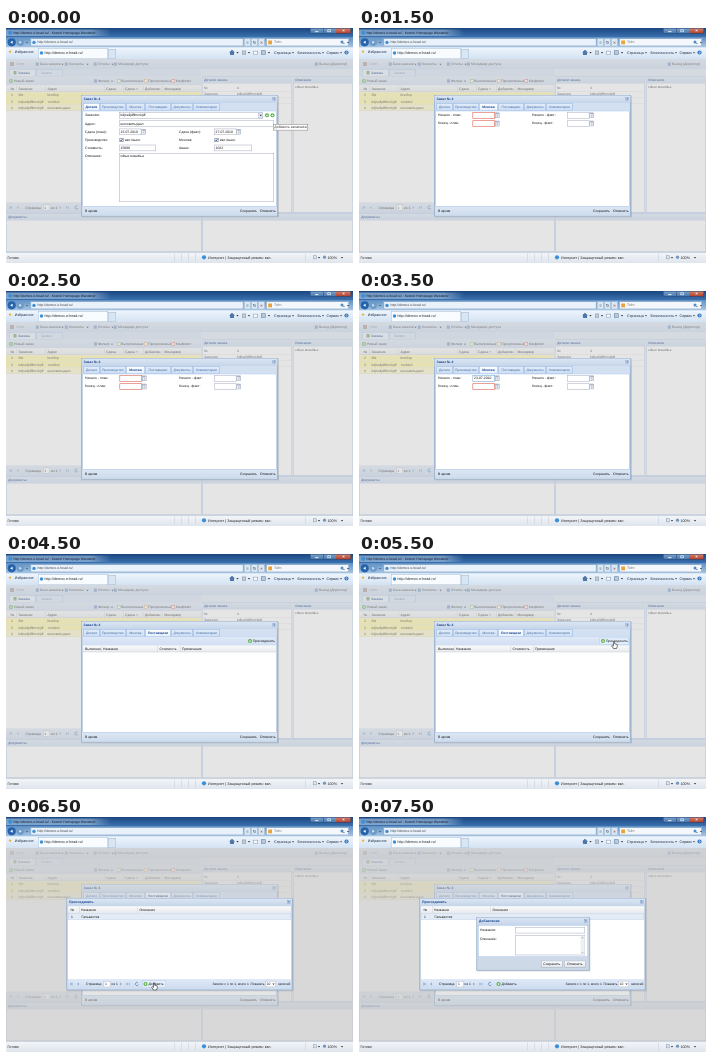
Recreate the animation shown at these times as an HTML page with a canvas. Size 347 by 235 pixels, loop 8000 ms.

```html
<!DOCTYPE html>
<html lang="ru">
<head>
<meta charset="utf-8">
<title>Заказы</title>
<style>
html, body { margin: 0; width: 100%; height: 100%; overflow: hidden; background: #fff; }
canvas { display: block; width: 347px; height: 235px; }
</style>
</head>
<body>
<canvas id="stage"></canvas>
<script>
const W = 347, H = 235, LOOP = 8000;
const canvas = document.getElementById('stage');
const ctx = canvas.getContext('2d');
const dpr = window.devicePixelRatio || 1;
canvas.width = W * dpr;
canvas.height = H * dpr;
ctx.scale(dpr, dpr);
ctx.textRendering = 'geometricPrecision';

const NAVY = '#15428b', LINE = '#99bbe8', FIELD = '#b5b8c8', GREEN = '#4fae3c';

function rect(x, y, w, h, color) {
  ctx.fillStyle = color;
  ctx.fillRect(x, y, w, h);
}

function frame(x, y, w, h, color, width = 0.6) {
  ctx.strokeStyle = color;
  ctx.lineWidth = width;
  ctx.strokeRect(x + width / 2, y + width / 2, w - width, h - width);
}

function box(x, y, w, h, fill, stroke, width) {
  rect(x, y, w, h, fill);
  frame(x, y, w, h, stroke, width);
}

function shade(x, y, w, h, top, bottom) {
  const g = ctx.createLinearGradient(0, y, 0, y + h);
  g.addColorStop(0, top);
  g.addColorStop(1, bottom);
  rect(x, y, w, h, g);
}

function dot(x, y, r, color) {
  ctx.fillStyle = color;
  ctx.beginPath();
  ctx.arc(x, y, r, 0, Math.PI * 2);
  ctx.fill();
}

function poly(points, fill, stroke) {
  ctx.beginPath();
  points.forEach(([x, y], i) => i ? ctx.lineTo(x, y) : ctx.moveTo(x, y));
  ctx.closePath();
  ctx.fillStyle = fill;
  ctx.fill();
  if (stroke) {
    ctx.strokeStyle = stroke;
    ctx.lineWidth = 0.6;
    ctx.stroke();
  }
}

// Laid out ten times larger, so tiny letters keep their true spacing.
function text(x, y, s, color = '#111', bold = false, size = 3.4, align = 'left') {
  ctx.save();
  ctx.translate(x, y);
  ctx.scale(0.1, 0.1);
  ctx.font = `${bold ? 'bold ' : ''}${size * 10}px "Liberation Sans", Arial, sans-serif`;
  ctx.textBaseline = 'middle';
  ctx.textAlign = align;
  ctx.fillStyle = color;
  ctx.fillText(s, 0, 0);
  ctx.restore();
}

const down = (x, y, color = '#333') => poly([[x - 1.1, y - 0.6], [x + 1.1, y - 0.6], [x, y + 0.8]], color);

function side(x, y, dir, color) {
  poly([[x - dir, y - 1.5], [x - dir, y + 1.5], [x + dir, y]], color);
}

function plus(x, y) {
  dot(x, y, 2, GREEN);
  rect(x - 1.2, y - 0.3, 2.4, 0.6, '#fff');
  rect(x - 0.3, y - 1.2, 0.6, 2.4, '#fff');
}

function field(x, y, w, value = '', stroke = FIELD, h = 6.4) {
  box(x, y, w, h, '#fff', stroke);
  text(x + 1.5, y + 3.3, value);
}

function dateField(x, y, value, stroke) {
  field(x, y, 22.5, value, stroke);
  box(x + 22.5, y + 0.4, 4.4, 5.4, '#f1f4f8', '#8d9fb5', 0.5);
  rect(x + 23.2, y + 1, 3, 1, '#8aa3c4');
  rect(x + 24.2, y + 3, 1.2, 1.2, '#c8968c');
}

function checkbox(x, y) {
  box(x, y - 2, 4, 4, '#fff', '#6b7c8e');
  ctx.beginPath();
  ctx.moveTo(x + 0.9, y);
  ctx.lineTo(x + 1.7, y + 1);
  ctx.lineTo(x + 3.1, y - 1.2);
  ctx.strokeStyle = '#223f77';
  ctx.lineWidth = 0.7;
  ctx.stroke();
  text(x + 5.5, y, 'вкл./выкл.');
}

function gridHead(x, y, w, cols, h = 6.5) {
  shade(x, y, w, h, '#fafafa', '#e6e9ed');
  rect(x, y + h - 0.5, w, 0.5, '#d0d0d0');
  cols.forEach(([cx, label]) => {
    if (cx > x + 6) rect(cx - 2, y, 0.5, h, '#d0d0d0');
    text(cx, y + h / 2, label);
  });
}

function hand(x, y) {
  poly([[x, y], [x + 1.1, y], [x + 1.2, y + 2.3], [x + 3.6, y + 2.9], [x + 3.9, y + 4.6],
    [x + 3, y + 7], [x, y + 7], [x - 1.8, y + 4.2], [x - 1.1, y + 3.6], [x, y + 4.4]], '#fff', '#222');
}

function titleBar() {
  shade(0, 0, W, 9, '#1b4680', '#3a71ae');
  const glow = ctx.createLinearGradient(0, 0, 105, 0);
  glow.addColorStop(0, 'rgba(190,214,238,.55)');
  glow.addColorStop(0.8, 'rgba(190,214,238,.5)');
  glow.addColorStop(1, 'rgba(190,214,238,0)');
  rect(0, 1.5, 105, 6.5, glow);
  dot(4.2, 4.7, 2, '#3a8fd8');
  text(7.5, 4.9, 'http://demox.e-head.ru/ - Kestrel Homepage Wanderer', '#0b1a2c');
  shade(304, 0, 26, 5.5, '#7fa3ca', '#4677ad');
  shade(330, 0, 15, 5.5, '#d28873', '#b23c28');
  frame(304, 0, 41, 5.5, '#1f4474', 0.5);
  rect(317, 0, 0.5, 5.5, '#1f4474');
  rect(309, 3.3, 3.5, 0.8, '#fff');
  frame(321.5, 1.5, 3.4, 2.6, '#fff', 0.6);
  text(337.5, 2.9, '×', '#fff', true, 4.5, 'center');
}

function addressBar() {
  shade(0, 9, W, 10.5, '#5f90c4', '#a9c7e5');
  dot(5.7, 14.3, 4.1, '#2663ab');
  dot(14.3, 14.3, 3.7, '#6f9bc9');
  side(5.4, 14.3, -1.2, '#fff');
  side(14.5, 14.3, 1.2, '#e5eff8');
  down(21, 14.5, '#365678');
  box(24.5, 10.4, 213, 7.9, '#e9f1fa', '#6f93b8');
  dot(28, 14.4, 1.7, '#3a8fd8');
  text(31.5, 14.5, 'http://demox.e-head.ru/', '#444');
  [238, 245, 252].forEach((x, i) => {
    box(x, 10.4, 6.8, 7.9, '#dbe8f5', '#8eabc9', 0.5);
    text(x + 3.4, 14.4, ['≡', '↻', '×'][i], ['#567', '#567', '#b04b3b'][i], true, 4.2, 'center');
  });
  box(260, 10.4, 83, 7.9, '#f4f8fc', '#6f93b8');
  rect(262.2, 12.5, 3.8, 3.8, '#e9a33a');
  text(268, 14.5, 'Tolm', '#777', false, 3.6);
  dot(336, 14, 1.5, '#538bc4');
  rect(337, 15, 1.7, 0.8, '#538bc4');
  down(342, 14.5);
}

function favorites() {
  shade(0, 19.5, W, 11.5, '#eef5fc', '#d3e2f2');
  text(2, 24, '★', '#e8ac20', false, 4.6);
  text(8.8, 24.3, 'Избранное', '#1a2a44', false, 3.7);
  box(32, 20.4, 70, 10.6, '#f9fcff', '#a5bbd2', 0.5);
  dot(35.5, 25, 1.7, '#3a8fd8');
  text(38.5, 25, 'http://demox.e-head.ru/', '#222', false, 3.7);
  box(102, 21, 8, 9.5, '#d8e5f3', '#a5bbd2', 0.5);
  poly([[223, 24.5], [226, 21.8], [229, 24.5], [228, 24.5], [228, 27], [224, 27], [224, 24.5]], '#4f76a8');
  down(231.5, 24.7);
  box(236, 22.7, 4, 4, '#c3cad3', '#8d99a8', 0.5);
  down(243, 24.7);
  box(247, 22.9, 5, 3.5, '#fff', '#718ba6', 0.5);
  box(255, 22.5, 4.5, 4, '#b9c8da', '#5d7896', 0.5);
  down(263, 24.7);
  [[268, 'Страница', 287], [291.5, 'Безопасность', 317], [320.5, 'Сервис', 335]].forEach(([x, s, a]) => {
    text(x, 24.6, s, '#1a2a44', false, 3.7);
    down(a, 24.8);
  });
  dot(340.5, 24.5, 2.1, '#3c79bd');
  text(340.5, 24.6, '?', '#fff', true, 3.4, 'center');
}

function statusBar() {
  shade(0, 224, W, 11, '#f4f6f9', '#dfe5ed');
  rect(0, 224, W, 0.6, '#b3bfcc');
  text(1.5, 229.5, 'Готово', '#222', false, 3.7);
  [168, 175, 182, 189, 299].forEach(x => rect(x, 225.5, 0.5, 8, '#c4cdd7'));
  dot(198, 229.3, 2.1, '#3a8fd8');
  text(202, 229.5, 'Интернет | Защищенный режим: вкл.', '#222', false, 3.7);
  box(307, 227.5, 3.6, 3.6, '#dce6f0', '#8195ab', 0.5);
  down(313, 229.6);
  dot(318.5, 229.2, 1.6, '#7396bb');
  text(321.5, 229.5, '100%', '#222', false, 3.7);
  down(336, 229.6);
}

function browser() {
  titleBar();
  addressBar();
  favorites();
  statusBar();
}

function page() {
  rect(0, 31, W, 193, '#dfe8f6');
  shade(0, 31, W, 10, '#dfe9f7', '#c9daf0');
  rect(4, 34, 4, 4, '#a99a9a');
  text(10, 36.3, 'i-lorn', '#888', false, 3.7);
  [[34, 'База заказов', 55], [63, 'Контакты', 80], [92, 'Отчеты', 105], [112, 'Менеджер доступа'], [313, 'Выход (Директор)']]
    .forEach(([x, s, a]) => {
      rect(x - 4.2, 34.5, 3, 3.3, '#789dce');
      text(x, 36.3, s, '#333');
      if (a) down(a + 1.5, 36.4);
    });

  rect(0, 41, 195, 7.5, '#d3e1f3');
  box(3, 41, 27, 8, '#eaf2fc', LINE, 0.5);
  box(30.5, 41, 26, 7.5, '#d9e6f6', LINE, 0.5);
  rect(7.5, 43, 3, 3.5, '#729c62');
  text(12, 45, 'Заказы', NAVY, true);
  text(35, 45, 'Заявки', '#6b8bb8');
  shade(0, 48.5, 195, 9, '#dfe9f7', '#cddcf0');
  plus(5, 53);
  text(8, 53.2, 'Новый заказ', '#222');
  rect(88, 51.3, 3, 3.3, '#789dce');
  text(92, 53.2, 'Фильтр', '#222');
  down(106, 53.3);
  [[111, 'Выполненные', '#7ebd6a'], [138, 'Просроченные', '#dfa35f'], [165.5, 'Конфликт', '#d76a5f']].forEach(([x, s, c]) => {
    box(x, 51.2, 3.5, 3.5, '#fff', c);
    text(x + 4.2, 53.2, s, '#222');
  });

  rect(0, 57.5, 195, 117, '#fff');
  gridHead(0, 57.5, 195, [[4.5, '№'], [12.5, 'Заказчик'], [41.5, 'Адрес'], [100, 'Сдача'], [119, 'Сдача'], [139, 'Добавлен'], [158.5, 'Менеджер']]);
  down(131, 61, '#777');
  [['2', 'бbt', 'bnобор'], ['3', 'kdjnalijdffmrckjdf', 'тлоblоd'], ['4', 'kdjnalijdffmrckjdf', 'шлковмтыдшл']].forEach((row, i) => {
    const y = 64.3 + i * 6.2;
    rect(0, y, 195, 6.1, i < 2 ? '#fff7a0' : '#fdf8c4');
    rect(0, y + 5.9, 195, 0.4, '#d9d9bd');
    [5, 12.5, 41.5].forEach((x, k) => text(x, y + 3.2, row[k], '#222'));
  });

  shade(0, 174.5, 195, 10, '#dfe9f7', '#cbdbf0');
  pager(2, 179.5);
  rect(0, 184.5, W, 1.5, '#c3d4eb');
  panel(0, 185.5, 195.5, 38.5, 'Документы');
  panel(196.5, 185.5, 150.5, 38.5, '');
  panel(196, 48.5, 90, 136, 'Детали заказа');
  panel(287, 48.5, 60, 136, 'Описание');
  [['№', '4'], ['Заказчик', 'kdjnalijdffmrckjdf'], ['Адрес', 'шлковмтыдшл']].forEach(([a, b], i) => {
    text(198, 60 + i * 6, a, '#222');
    text(231, 60 + i * 6, b, '#222');
    rect(196.5, 63 + i * 6, 89, 0.4, '#dedede');
  });
  text(289, 59.5, 'сdtые мошdtьа', '#222');
}

function panel(x, y, w, h, title) {
  box(x, y, w, h, '#fff', LINE, 0.5);
  shade(x + 0.5, y + 0.5, w - 1, 6.5, '#dce8f7', '#c8d9f0');
  text(x + 2.2, y + 4, title, NAVY, true, 3.3);
}

function pager(x, y) {
  [[3, -1], [9.5, -1], [52.5, 1], [59, 1]].forEach(([dx, d], i) => {
    side(x + dx, y, d, '#91a9c8');
    if (i === 0 || i === 3) rect(x + dx + d * 1.4, y - 1.5, 0.6, 3, '#91a9c8');
  });
  text(x + 17.5, y + 0.2, 'Страница');
  field(x + 35, y - 3.1, 7, '1');
  text(x + 43, y + 0.2, 'из 1');
  ctx.strokeStyle = '#4d8dcc';
  ctx.lineWidth = 0.9;
  ctx.beginPath();
  ctx.arc(x + 68.5, y, 1.6, 0.5, 5.4);
  ctx.stroke();
}

const mask = () => rect(0, 31, W, 193, 'rgba(204,204,204,.5)');

function dialog(x, y, w, h, title) {
  rect(x + 0.5, y + 1, w + 0.5, h, 'rgba(70,80,95,.2)');
  box(x, y, w, h, '#ced9e7', '#84a0c4');
  shade(x + 0.6, y + 0.6, w - 1.2, 7.4, '#dbe6f4', '#c5d5e9');
  text(x + 2.5, y + 4.3, title, NAVY, true);
  box(x + w - 5.5, y + 2.4, 3.4, 3.4, '#e4edf8', '#7b9bc4', 0.5);
  text(x + w - 3.8, y + 4.2, '×', NAVY, true, 3.4, 'center');
}

const TABS = [['Детали', 77.5, 16], ['Производство', 94, 25.5], ['Монтаж', 120, 19],
  ['Поставщики', 139.5, 25], ['Документы', 165, 22], ['Комментарии', 187.5, 26]];

function order(active) {
  dialog(75, 67, 197, 121.3, 'Заказ № 4');
  rect(76.5, 75, 194, 8, '#d3e0f1');
  TABS.forEach(([label, x, w], i) => {
    const on = i === active;
    shade(x, 75.4, w, 7.6, on ? '#fff' : '#e3edfa', on ? '#e4eefb' : '#ccdcf2');
    frame(x, 75.4, w, 7.6, '#8db2e3', 0.5);
    text(x + w / 2, 79, label, on ? NAVY : '#416aa3', on, 3.3, 'center');
  });
  box(76.5, 82.7, 194, 96, '#fff', LINE, 0.5);
  shade(76, 179, 195, 8.8, '#dbe6f4', '#cddbec');
  text(79, 183.4, 'В архив');
  text(234, 183.4, 'Сохранить');
  text(254, 183.4, 'Отменить');
}

function details() {
  order(0);
  text(79, 87.5, 'Заказчик:');
  field(113, 84.2, 144, 'kdjnalijdffmrckjdf');
  box(252.5, 84.5, 4.5, 5.8, '#dce8f7', FIELD, 0.5);
  down(254.7, 87.4);
  plus(261, 87.3);
  plus(266.5, 87.3);
  text(79, 95.7, 'Адрес:');
  field(113, 92.4, 155, 'шлковмтыдшл');
  text(79, 103.9, 'Сдача (план):');
  dateField(113, 100.6, '15-07-2010');
  text(173, 103.9, 'Сдача (факт):');
  dateField(208, 100.6, '27-07-2010');
  text(79, 112, 'Производство:');
  checkbox(113.5, 112);
  text(173, 112, 'Монтаж:');
  checkbox(208.5, 112);
  text(79, 120, 'Стоимость:');
  field(113, 116.7, 37, '15888');
  text(173, 120, 'Аванс:');
  field(208, 116.7, 38, '1022');
  text(79, 128.2, 'Описание:');
  field(113, 125, 155, 'сdtые мошdtьа', FIELD, 49);
  box(267, 96, 35, 6.4, '#fff', '#777', 0.5);
  text(268.3, 99.3, 'Добавить заказчика', '#333', false, 3.5);
}

function assembly(start) {
  order(2);
  ['Начало', 'Конец'].forEach((name, i) => {
    const y = 84.2 + i * 8.2, value = i ? '' : start;
    text(79, y + 3.1, name + ' - план:');
    dateField(113.5, y, value, value ? '#7eadd9' : '#dd6655');
    text(173, y + 3.1, name + ' - факт:');
    dateField(208, y, '');
  });
}

function suppliers(hover) {
  order(3);
  shade(77, 83, 193, 8.7, '#dfe9f7', '#cfdef1');
  if (hover) box(240.5, 83.7, 29, 7, '#e4eefb', '#b3cceb', 0.5);
  plus(244, 87.1);
  text(247, 87.2, 'Присоединить', '#111', false, 3.3);
  gridHead(77, 91.7, 193, [[79, 'Выполнен'], [97, 'Название'], [153.5, 'Стоимость'], [176, 'Примечание']]);
  if (hover) hand(254.5, 87.5);
}

function attach(hover) {
  suppliers(false);
  mask();
  dialog(60.5, 81, 226, 92.3, 'Присоединить');
  rect(62, 89.5, 223, 72.5, '#fff');
  gridHead(62, 89.5, 223, [[64.5, '№'], [75, 'Название'], [133.5, 'Описание']], 7);
  rect(62, 96.5, 223, 6.4, '#e3ebf7');
  frame(62, 96.5, 223, 6.4, '#c3d3e8', 0.4);
  text(65, 99.9, '1');
  text(75.5, 99.9, 'Гальваотик');
  shade(62, 162, 223, 10, '#dfe9f7', '#cddcf0');
  pager(62.5, 167);
  if (hover) box(136, 163.3, 24, 7.4, '#e4eefb', '#b3cceb', 0.5);
  plus(139.5, 167);
  text(142.5, 167.2, 'Добавить');
  text(206.5, 167.2, 'Записи с 1 по 1, всего 1', '#111', false, 3.3);
  text(244.5, 167.2, 'Показать', '#111', false, 3.3);
  field(259, 163.8, 11, '10');
  down(267.5, 167.1);
  text(272, 167.2, 'записей', '#111', false, 3.3);
  if (hover) hand(147.5, 166);
}

function addForm() {
  attach(false);
  dialog(117.5, 100, 113, 53.5, 'Добавление');
  box(119, 108, 110, 32, '#fff', LINE, 0.5);
  text(121, 113.3, 'Название:');
  field(156, 110, 70);
  text(121, 121.6, 'Описание:');
  field(156, 118.3, 70, '', FIELD, 20);
  rect(221.5, 118.8, 4, 19, '#eef0f3');
  down(223.5, 136, '#a4acb6');
  poly([[222.4, 121.2], [224.6, 121.2], [223.5, 119.8]], '#a4acb6');
  [[182, 'Сохранить'], [205, 'Отменить']].forEach(([x, s]) => {
    shade(x, 143.7, 21.5, 7, '#fff', '#dde3eb');
    frame(x, 143.7, 21.5, 7, '#9da9b8', 0.5);
    text(x + 10.75, 147.2, s, '#111', false, 3.4, 'center');
  });
}

const scenes = [
  [7500, addForm],
  [6500, () => attach(true)],
  [5500, () => suppliers(true)],
  [4500, () => suppliers(false)],
  [3500, () => assembly('23-07-2010')],
  [1500, () => assembly('')],
  [0, details]
];

const begin = performance.now();

function draw(now) {
  const t = Math.max(0, now - begin) % LOOP;
  browser();
  page();
  mask();
  scenes.find(([from]) => t >= from)[1]();
  requestAnimationFrame(draw);
}
draw(begin);
</script>
</body>
</html>
```
